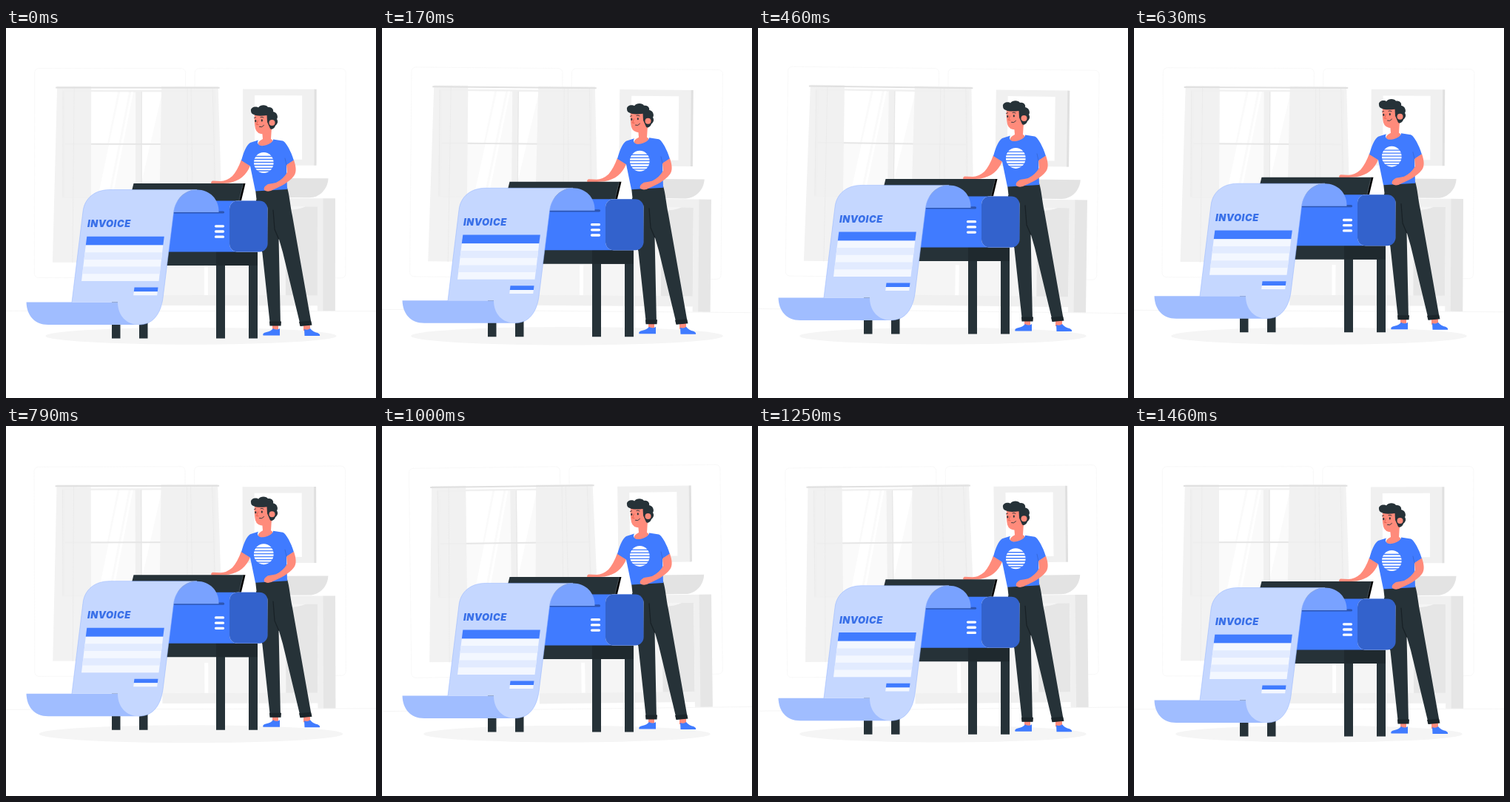
Recreate the animation shown at these times as an HTML page. Size 500 px wide and 500 px high, loop 1500 ms.

```html
<!DOCTYPE html>
<html lang="en">
<head>
<meta charset="utf-8">
<style>
  html, body { margin: 0; width: 100%; height: 100%; overflow: hidden; background: #fff; }
  svg { display: block; width: 100%; height: 100%; }
  .blue { fill: #407bff; }
  .dark { fill: #263238; }
  .skin { fill: #ff8b7b; }
  .white { fill: #fff; }
  .line { fill: none; stroke-linecap: round; stroke-linejoin: round; }
  .title { font: italic 900 13px Inter, Arial, sans-serif; letter-spacing: .5px; fill: #386fe8; }
</style>
</head>
<body>
<svg viewBox="0 0 500 500">
  <g id="room">
    <path d="M0 382.5H500" stroke="#ebebeb" stroke-width=".5"/>
    <g fill="none" stroke="#ebebeb" stroke-width=".35">
      <rect x="38.5" y="54.7" width="204" height="283" rx="5.7"/>
      <rect x="255" y="54.7" width="204" height="283" rx="5.7"/>
    </g>

    <!-- window -->
    <path d="M76 84H283V230H76Z" fill="#f0f0f0"/>
    <path d="M80 86.500H175V229H80ZM184 86.500H280V229H184Z" fill="#fafafa"/>
    <path class="white" d="M115 86.500H151L137 156H115ZM154 86.500H166L138 229H124ZM169 86.500H172L144 229H141ZM184 86.500H211L184 205Z"/>
    <path d="M80 157H280" stroke="#e6e6e6" stroke-width="2"/>
    <path d="M183 86V229" stroke="#e6e6e6"/>
    <g fill="#f0f0f0" opacity=".85">
      <path d="M69 79H115V317H63Z"/>
      <path d="M210 79H286.500L294 317H206Z"/>
    </g>
    <path class="line" d="M77 86V228M92 80L90 317M245 82V230M250 82L252 230M279 82L283 230" stroke="#e8e8e8" stroke-width=".7"/>
    <path d="M67 80.800H288.500" stroke="#e0e0e0" stroke-width="2"/>

    <!-- mirror and washstand -->
    <path d="M320 82.500H417V185.500H320Z" fill="#f0f0f0"/>
    <path d="M416.500 82.500H419.500V185.500H416.500Z" fill="#e0e0e0"/>
    <path class="white" d="M336 91H400V177.500H336Z"/>
    <path d="M211 240H421V362H211Z" fill="#f5f5f5"/>
    <path d="M270.500 320V361" stroke="#fff" stroke-width="5"/>
    <path d="M378 246Q398 245 405 241H421V362H378Z" fill="#e6e6e6"/>
    <path d="M211 361H430V375H211Z" fill="#f0f0f0"/>
    <path d="M345 230H429V382H421V241H345Z" fill="#f0f0f0"/>
    <path d="M428.500 230H445V382H428.500Z" fill="#e6e6e6"/>
    <path d="M370 203H435.500C435 217 424 229 410 229H370Z" fill="#e3e3e3"/>
  </g>

  <ellipse id="shadow" cx="250" cy="416.200" rx="193.900" ry="11.300" fill="#f5f5f5"/>

  <g id="scene">
    <!-- man -->
    <path class="skin" d="M360 400H368V410H360ZM402 400H411V409H402Z"/>
    <path class="blue" d="M361 406Q366 409 370 406V415.500H347.500Q346 412 352 411T361 406ZM403 407Q408 409 411 406Q415 411 421 412Q425 414 424 416H403.500Z"/>
    <path class="dark" d="M337 218L380 216C383 225 384 240 387 254L413 401L398 402.500L374 303L368.500 284L371 402H357L346 300Z"/>
    <path class="line" d="M361 246L363 272L368.500 285" stroke="#182126" stroke-width="1.200"/>
    <path d="M356 396.500H372L371.500 402.500H356.500ZM396 397L412 395.500L413.500 401.500L397.500 403Z" fill="#1c262b"/>
    <path class="skin" d="M318 178L330 186C325 199 315 207 301 209.500L279 211Q275 209 279 206.500L290 207Q298 207 306 200Q313 192 318 178Z"/>
    <path class="skin" d="M346 138L359 134L358 150Q362 152 359 155Q350 163 341 158Q339 154 347 150Z"/>
    <path class="blue" d="M341 151.500C338 156 342 160 348 159C355 158 361 154 361 150.500L374 152.500C379 154 387 171 389 179L379 185.500L380 218L337 220.500L330 186.500L318 179C321 168 325 158 330 155Z"/>
    <path class="skin" d="M379 185L389 178.500C392 187 393 195 389 200C382 209 371 214 362 218Q354 223 349 219Q347 215 354 211Q361 210 365 209Q375 204 380 195Z"/>
    <path class="line" d="M379 185L377 176" stroke="#3362cc" stroke-width=".7"/>
    <ellipse class="white" cx="348.300" cy="182" rx="13.300" ry="14"/>
    <path d="M334 173.500H362M334 177.500H362M334 181.500H362M334 185.500H362M334 189.500H362M334 193H362" stroke="#407bff" stroke-width="1.300"/>
    <path class="skin" d="M336 115H358L361 130Q360 142 350 143.500Q339 144 337 136Q335 127 336 115Z"/>
    <path class="dark" d="M331 112C330 107 338 105 341 107.500C344 103 352 103.500 354 107C360 106 362 111 361 113C367 114 368 121 366 123C369 128 365 131 364 132C363 136 358 138 357 136L353 127L352.500 118C345 119 338 119 335 117Q331 116 331 112Z"/>
    <circle class="skin" cx="359.500" cy="128" r="4"/>
    <g class="line" stroke="#263238">
      <path d="M337.300 125V126.200M345.800 124.300V125.500" stroke-width="1.900"/>
      <path d="M335.500 121.500L337.500 120.800M344 120.500Q346 119.500 348 121M342.500 133.500Q346 135 348.500 131.500" stroke-width=".9"/>
    </g>
    <path class="line" d="M340.500 125L338.500 130.500H341" stroke="#e8604f" stroke-width="1"/>

    <!-- printer -->
    <path class="dark" d="M143 320H154.500V419.500H143ZM180 320H191.500V419.500H180ZM284 320H296V419.500H284ZM328 320H340V419.500H328ZM140 300H340V321H140Z"/>
    <path d="M284 302H340V321H284Z" fill="#1f292e"/>
    <path class="dark" d="M172.500 210H321L315 236H166Z"/>
    <path d="M320.500 210H323.500L317.500 235H314.500Z"/>
    <path class="line" d="M320.300 211L315 233" stroke="#59636a" stroke-width=".7"/>
    <path class="blue" d="M160 233.500H340V302.500H160Z"/>
    <rect x="302" y="233.500" width="51.500" height="69" rx="11" fill="#fff"/>
    <path class="dark" d="M338 232L353 232L354 303H346Z"/>
    <rect x="302" y="233.500" width="51.500" height="69" rx="11" fill="#3362cc"/>
    <path class="line" d="M215 249H293.500" stroke="#2d56b3" stroke-width="3.200"/>
    <path class="line" d="M283.500 267.800H293.500M283.500 275H293.500M283.500 282.200H293.500" stroke="#fff" stroke-width="3.300"/>

    <!-- paper -->
    <path d="M226 249C229 231 242 218.500 258 218.500C275 218.500 288 231 287.500 249Z" fill="#79a2ff"/>
    <path d="M27.500 370.500H152L181 401H57C38 401 28 388 27.500 370.500Z" fill="#a0bdff"/>
    <path d="M89 370.500L104 248C106 230 120 218.500 140 218.500H258C242 218.500 229 231 226.500 249L212 365C209 387 198 401 180 401C163 401 151 389 151 370.500Z" fill="#c5d7ff"/>
    <path class="line" d="M89 370.500L104 248C106 230 120 218.500 140 218.500H258C242 218.500 229 231 226.500 249L212 365C209 387 198 401 180 401" stroke="#8fb0ff" stroke-width=".5"/>
    <text class="title" x="110" y="269.300">INVOICE</text>
    <path class="blue" d="M109.300 281.700H213.800L212.300 293.500H107.800Z"/>
    <path d="M107.800 293.500H212.300L206.500 342H102Z" fill="#f3f7ff"/>
    <path d="M106.600 303.200H211.100L210 312.900H105.500ZM104.300 322.600H208.800L207.700 332.300H103.200Z" fill="#e2ebff"/>
    <path class="blue" d="M173.500 350.500H205.500L204.800 356.200H172.800Z"/>
    <path d="M172.800 356.200H204.800L204.200 361.200H172.200Z" fill="#f3f7ff"/>
  </g>
</svg>
<script>
  const LOOP = 1500, STEPS = 36;
  const [room, shadow, scene] = ['room', 'shadow', 'scene'].map(id => document.getElementById(id));

  const sway = [[0, 0], [.25, 1], [.75, -1], [1, 0]];
  const lift = [[0, 0], [.5, -10], [1, 0]];
  const beat = [[0, 1], [.1, 1.1], [.3, 1], [.4, 1], [.5, 1.1], [.6, 1], [1, 1]];

  // Linear interpolation between [position, value] keys.
  function at(keys, p) {
    const i = keys.findIndex(key => key[0] >= p);
    if (i < 1) return keys[0][1];
    const [p0, v0] = keys[i - 1], [p1, v1] = keys[i];
    return v0 + (v1 - v0) * (p - p0) / (p1 - p0);
  }

  function draw(now) {
    // 24 steps a second, each posed at its middle.
    const step = Math.floor((now + 5) % LOOP / LOOP * STEPS);
    const p = (step + .5) / STEPS;
    room.setAttribute('transform', `rotate(${at(sway, p)} 250 227)`);
    shadow.setAttribute('transform', `translate(250 416.2) scale(${at(beat, p)}) translate(-250 -416.2)`);
    scene.setAttribute('transform', `translate(0 ${at(lift, p) + .3})`);
  }

  const start = performance.now();
  function tick() {
    draw(performance.now() - start);
    requestAnimationFrame(tick);
  }
  tick();
</script>
</body>
</html>
```
